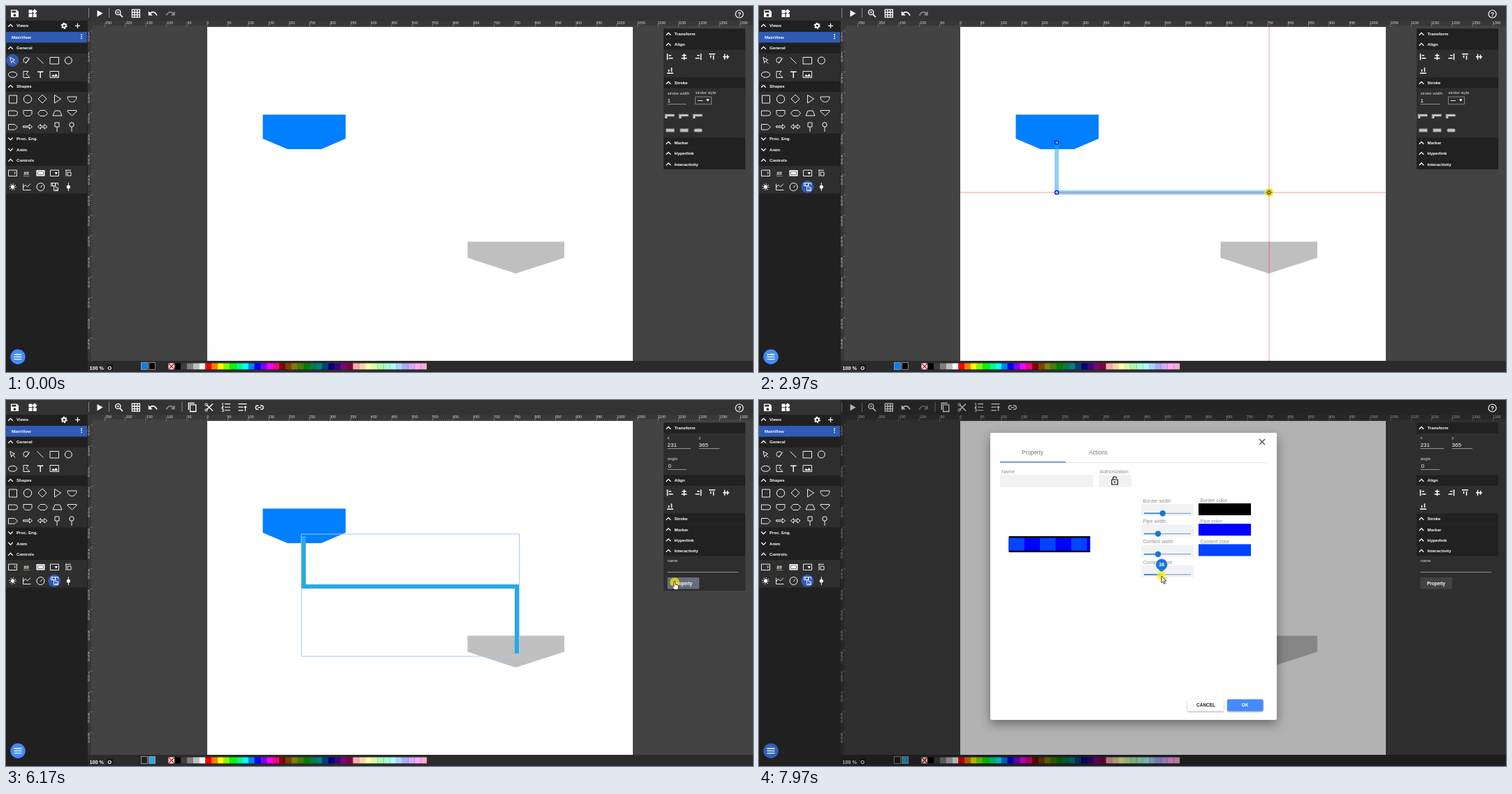
An HTML page that plays this animation: 1069 px wide and 524 px high, repeating every 8000 ms.

```html
<!DOCTYPE html>
<html lang="en">
<head>
<meta charset="utf-8">
<title>Pipe editor</title>
<style>
html,body{margin:0;width:100%;height:100%;overflow:hidden;background:#434343}
svg{display:block;width:1069px;height:524px}
text{font-family:"Liberation Sans",Arial,sans-serif;white-space:pre}
</style>
</head>
<body>
<svg id="stage" viewBox="0 0 1069 524" xmlns="http://www.w3.org/2000/svg"></svg>
<script>
const DARK = '#212121', PANEL = '#2e2e2e', BLUE = '#2f5bb5', PIPE = '#29a9e1';

const rect = (x, y, w, h, fill, more = '') =>
  `<rect x="${x}" y="${y}" width="${w}" height="${h}" fill="${fill}" ${more}/>`;
const circle = (x, y, r, fill, more = '') =>
  `<circle cx="${x}" cy="${y}" r="${r}" fill="${fill}" ${more}/>`;
const text = (x, y, s, size, fill = '#fff', more = '') =>
  `<text x="${x}" y="${y}" font-size="${size}" fill="${fill}" ${more}>${s}</text>`;
const line = (d, stroke = '#fff', w = 1, more = '') =>
  `<path d="${d}" fill="none" stroke="${stroke}" stroke-width="${w}" ${more}/>`;
const solid = (d, fill = '#fff', more = '') => `<path d="${d}" fill="${fill}" ${more}/>`;
const group = (id, body, more = '') => `<g id="${id}" ${more}>${body}</g>`;
const bold = 'font-weight="700"', middle = 'text-anchor="middle"';
const range = (n, f) => Array.from({length: n}, (_, i) => f(i)).join('');

const chevron = (x, y, up) => line(`M${x - 3.3} ${y + (up ? 1.8 : -1.6)}l3.3 ${up ? -3.4 : 3.4} 3.3 ${up ? 3.4 : -3.4}`, '#fff', 1.3);

function toolbar() {
  return rect(0, 0, 1069, 21, '#333') +
    solid('M7 5.5h8.5l2.5 2.5v8h-11zM8.3 6.8v2.8h6.2v-2.8zM12.4 11.3a1.9 1.9 0 1 0 .01 0z', '#fff', 'fill-rule="evenodd"') +
    rect(32.5, 5.5, 5, 4.8, '#fff') + rect(32.5, 11.2, 5, 4.8, '#fff') + rect(38.8, 11.2, 5, 4.8, '#fff') +
    solid('M41 4.2l3.6 3.6-3.6 3.6-3.6-3.6z') +
    line('M118.5 3v14M147.5 3v14', '#888') + solid('M130.5 6l8 4.6-8 4.9z') +
    circle(160.3, 9, 3.6, 'none', 'stroke="#fff" stroke-width="1.4"') +
    line('M163 11.8l4 4.2', '#fff', 1.7) + line('M158.5 9h3.6M160.3 7.2v3.6', '#fff', .8) +
    line('M180.4 5.2h11v11h-11zM184 5v11M187.8 5v11M180 9h12M180 12.6h12', '#fff', 1.3) +
    line('M206 10.5q6-5 10 3', '#fff', 1.7) + solid('M203.8 7.2v6.2h6z') +
    line('M239.500 10.5q-6-5-10 3', '#8a8a8a', 1.7) + solid('M241.800 7.2v6.2h-6z', '#8a8a8a');
}

function editTools() {
  return line('M252 3v14', '#888') +
    line('M263.5 6.800h8.300v9.700h-8.300zM261.300 14v-9.500h8.400', '#fff', 1.3) +
    line('M287 7l9 8.500M287 14l9-8.600', '#fff', 1.4) +
    circle(286.6, 6.5, 1.7, 'none', 'stroke="#fff"') + circle(286.6, 14.500, 1.7, 'none', 'stroke="#fff"') +
    line('M313 5.600h8M313 10.200h8M313 14.800h8M310 4v3.500M309 9h2l-2 2.500h2M309 13.300h2v3h-2', '#fff', 1.1) +
    line('M332.500 5.600h12M332.500 10.200h7M332.500 14.800h7M342.500 16v-7M340.700 11l1.800-2 1.800 2', '#fff', 1.2) +
    line('M361.500 8h-1.500a2.700 2.700 0 0 0 0 5.400h1.500M364 8h1.500a2.700 2.700 0 0 1 0 5.400h-1.500M360.500 10.700h4.800', '#fff', 1.3);
}

function rulers() {
  const u = 29.33;
  return rect(117, 21, 952, 9, '#383838') + rect(117, 30, 7, 478, '#383838') +
    line('M124 28.700H1069', '#777', 1.600, 'stroke-dasharray=".6 2.333" stroke-dashoffset="1.2"') +
    line('M122.800 30V508', '#777', 1.600, 'stroke-dasharray=".6 2.333" stroke-dashoffset="1"') +
    range(32, i => {
      const n = (i - 5) * 50, x = 288 + (i - 5) * u;
      return line(`M${x} 26v4`, '#999', .6) + text(x - .8, 26, n, 5.3, '#ddd');
    }) +
    range(16, i => {
      const y = 36.500 + i * u;
      return line(`M120 ${y - .5}h4`, '#888', .6) +
        [...String(100 + i * 50)].map((c, k) => text(117, y + 4.500 + k * 5, c, 5.3, '#ddd')).join('');
    });
}

function sidebar() {
  const heads = [[28, 'Views', 1], [60, 'General', 1], [115, 'Shapes', 1], [190, 'Proc. Eng.', 0], [205.500, 'Anim', 0], [220.800, 'Controls', 1]];
  const shapes = 'M5.800 73.500l2 8 1.600-3 3.200-1.300zM9.600 78.500l3.600 4M26 81q-3-6 2-7t4 3-5 4M28 82.500l6-8M44.500 73.500l9 9M63 73.500h12.500v9.500h-12.500z' +
    'M25 93.500h7l-3 4 5 5h-9zM63 93.500h12.500v9h-12.500z' +
    'M4.500 128h11v11h-11zM52 127l6 6-6 6-6-6zM69.500 127.500l9 5.500-9 6zM88 130h13c0 10-13 10-13 0z' +
    'M3.500 150h9.500a3.500 3.500 0 0 1 0 7h-9.500zM25 149.500h12v5l-3 3h-6l-3-3zM45.500 153.500l3.500-4h7l3.500 4-3.500 4h-7zM70 150h7l3 7h-13zM88 149.500h13v1.500l-6.500 6-6.500-6z' +
    'M3.500 169.500h9l4 3.800-4 3.800h-9zM24.500 171.800h9v-2.300l4 3.300-4 3.300v-2.300h-9zM45.500 172.800l4-3.300v2.300h5.500v-2.300l4 3.300-4 3.300v-2.300h-5.500v2.300zM70 167h6v6h-6zM73 173v7M94 173v7' +
    'M3.500 235h12v8.500h-12zM12.800 237v4M63.500 235h12v8.500h-12zM86 234.500v9.500M85 235.200h8M88 238h5v5h-5z' +
    'M24.500 254.500v9h11M24.500 260l3-4 3 3 4.500-4.500M49.300 260l2.700-3.500M89.300 253v12';
  const ring = (x, y, r) => circle(x, y, r, 'none', 'stroke="#fff"');
  return rect(0, 21, 117, 503, '#202020') + rect(0, 37, 116, 15.500, BLUE) +
    rect(0, 68, 116, 40, PANEL) + rect(0, 123, 116, 59.500, PANEL) + rect(0, 229, 116, 39.500, PANEL) +
    heads.map(([y, s, up]) => chevron(6.500, y, up) + text(15, y + 2.300, s, 6.1, '#fff', bold)).join('') +
    text(8, 46.500, 'MainView', 6.1, '#fff', bold) +
    [41, 43.700, 46.400].map(y => circle(108, y, .9, '#fff')).join('') +
    circle(83.200, 28.300, 2.500, 'none', 'stroke="#fff" stroke-width="1.900"') +
    circle(83.200, 28.300, 4, 'none', 'stroke="#fff" stroke-width="1.200" stroke-dasharray="2.100 2.090"') +
    line('M99 28.300h7M102.500 24.800v7', '#fff', 1.2) +
    circle(9.300, 78, 9, BLUE, 'id="pickTool"') + circle(69.300, 258.800, 9, BLUE, 'id="pipeTool"') +
    line(shapes, '#eee', 1) + line('M45 94.300h8.500M49.200 94v9', '#fff', 1.4) + solid('M65 101l2.500-3 2 2 2-3 3 4z') +
    ring(89.300, 78, 5) + ring(31, 133.300, 5.700) + ring(94, 170, 3.200) + ring(49.500, 259, 5.500) +
    '<ellipse cx="9.500" cy="98.300" rx="6.200" ry="4" fill="none" stroke="#fff"/>' +
    text(25.200, 241.500, '##', 7, '#fff', bold) + line('M25 243.500h9', '#c98b3a', .9) +
    rect(43.500, 235, 12, 8.500, '#fff') + line('M45.500 237h8v4.500h-8z', '#555', .8) + solid('M69.500 238h4.500l-2.200 3.500z') +
    circle(9.500, 259, 2.700, '#fff') + circle(9.500, 259, 4.300, 'none', 'stroke="#fff" stroke-width="1.400" stroke-dasharray="1 2.377"') +
    line('M64.500 253.500h6v4h-6zM66.500 253.500v4M68.500 257.500v7h6v-4.500h-3.500v-6.500h3.500v3M71 264v-2M73 264v-2', '#fff', .9) +
    circle(89.300, 259, 2.600, '#fff') +
    circle(17, 502.300, 10.700, '#448aff', 'id="menu"') + line('M11.500 499h11M11.500 502.300h11M11.500 505.600h11', '#fff', 1.3);
}

function bottomBar() {
  const greys = ['#000', '#3f3f3f', '#7f7f7f', '#bfbfbf', '#fff'];
  const cells = greys.concat(...[50, 25, 83.3].map(l => Array.from({length: 12}, (_, i) => `hsl(${i * 30},100%,${l}%)`)));
  return rect(117, 508, 952, 16, '#2b2b2b') + text(119.500, 520.500, '100 %', 7.2, '#fff', bold) +
    rect(144, 513, 9, 9, '#1c1c1c') + text(145.300, 521, 'O', 7.600, '#fff', bold) +
    rect(193.500, 510.500, 9, 10, '#007fff', 'id="fillBox" stroke="#aaa" stroke-width=".8"') +
    rect(204.500, 510.500, 9, 10, '#000', 'id="lineBox" stroke="#aaa" stroke-width=".8"') +
    rect(232.500, 511.500, 8.800, 8.800, '#fff') + line('M233 512l7.800 8M240.800 512l-7.800 8', '#d00', 1.2) +
    cells.map((c, i) => rect((241.300 + i * 8.800).toFixed(1), 511.500, 8.850, 8.800, c)).join('');
}

function rightPanel() {
  const head = (y, s) => rect(941, y - 7.500, 117, 15, DARK) + chevron(948, y, 1) + text(956.500, y + 2.200, s, 6.1, '#fff', bold);
  const side = 'M-4-4.500v9M-2-2h3.500M-2 2h6', mid = 'M0-4.500v9M-3-2h6M-4 2h8';
  const icon = (x, y, d, turn = '') => line(d, '#fff', 1.5, `transform="translate(${x} ${y}) ${turn}"`);
  const align = y => icon(950.500, y, side) + icon(970.500, y, mid) + icon(990.500, y, side, 'scale(-1 1)') +
    icon(1010.500, y, side, 'rotate(90) scale(1 -1)') + icon(1030.500, y, mid, 'rotate(90)') + icon(950.500, y + 19.500, side, 'rotate(-90)');
  const joins = [950.500, 970.500, 990.500].map(x =>
    line(`M${x - 6} 161v-4.500h12`, '#aaa', 3.5) + line(`M${x - 5} 161v-4.500h11`, '#fff', .6)).join('') +
    rect(944.500, 175.500, 12, 5, '#aaa') + rect(964.500, 175.500, 12, 5, '#aaa') + rect(984.500, 175.500, 12, 5, '#aaa', 'rx="2.500"') +
    line('M945 178h11M966 178h9M986 178h9', '#fff', .7);
  const field = (x, y, label, value, w) => text(x, y, label, 5.9, '#ddd') + text(x, y + 11, value, 8.1) + line(`M${x} ${y + 14}h${w}`, '#aaa', .8);
  return group('idlePanel', rect(941, 32.500, 117, 201.500, PANEL) + head(40, 'Transform') + head(55, 'Align') + align(72.700) +
      head(110, 'Stroke') + field(946.500, 126.500, 'stroke width', '1', 27.500) + text(986.500, 126, 'stroke style', 5.9, '#ddd') +
      line('M986.500 130h23v10.500h-23z', '#999', .8) + line('M990 135.500h7', '#fff', .9) + solid('M1002 133.300h4.500l-2.200 3.800z') + joins +
      head(196, 'Marker') + head(211, 'Hyperlink') + head(226.300, 'Interactivity')) +
    group('pickPanel', rect(941, 32.500, 117, 240.500, PANEL) + head(40, 'Transform') +
      field(946.500, 55.500, 'x', '231', 33.500) + field(991.500, 55.500, 'y', '365', 29.500) + field(946.500, 85.500, 'angle', '', 27.500) +
      text(947.500, 97, '0', 8.1) + head(115, 'Align') + align(132.700) +
      head(170, 'Stroke') + head(185.300, 'Marker') + head(200.500, 'Hyperlink') + head(215.800, 'Interactivity') +
      text(946.500, 231.500, 'name', 5.9, '#ddd') + line('M946.500 246.500h101.500', '#aaa', .8) +
      rect(946.500, 254, 45.500, 16.500, '#424242', 'id="propBtn" rx="1"') + text(969, 264.800, 'Property', 6.300, '#fff', `${middle} ${bold}`));
}

function canvas() {
  const node = (id, x, y, fill) => circle(x, y, 2.700, fill, `id="${id}" stroke="#00f" stroke-width="1.200"`);
  return rect(288, 30, 609, 478, '#fff') + solid('M367.500 155.500h118.500v34.500l-35 15h-48l-35.500-15z', '#007fff') +
    solid('M660.500 337.500h138.500v23l-69.500 22.500-69-22.500z', '#bfbfbf') +
    line('', PIPE, 6, 'id="pipe"') + line('', '#22c', .6, 'id="rubber"') +
    node('node0', 426, 195.500, '#18c8ff') + node('node1', 426, 267, '#9df') + node('node2', 730.800, 267, '#9df') +
    rect(422.500, 192, 312, 175, 'none', 'id="pickBox" stroke="#a9c8ff"') +
    line('', '#ff0000', 1, 'id="cross" opacity=".4"');
}

function dialog() {
  const gray = '#8f8f8f', slot = '#f1f2f4';
  const slider = (i, label, x) => {
    const y = 149 + i * 29.200;
    return rect(547, y, 75, 17, slot) + text(549.500, y - 2, label, 7.05, gray) +
      line(`M551 ${y + 13.300}h67`, '#6a9bcc', 1) +
      (i < 3 ? line(`M551 ${y + 13.300}H${x}`, '#1976d2', 1.400) + circle(x, y + 13.300, 4.200, '#1976d2') : '');
  };
  const color = (i, label, fill) => rect(629, 148 + i * 29.200, 75, 17, fill) + text(631.500, 146 + i * 29.500, label, 7.05, gray);
  return rect(331, 47, 410, 411, '#fff', 'rx="2" style="filter:drop-shadow(0 6px 8px rgba(0,0,0,.4))"') +
    line('M716 56l8 8M724 56l-8 8', '#444', 1.2) +
    text(391.500, 78, 'Property', 8.2, '#777', middle) + text(485.500, 78, 'Actions', 8.2, '#777', middle) +
    line('M345 89.800h383', '#ddd', .8) + line('M345 88.800h94', '#3668c4', 1.3) +
    text(347, 105.300, 'Name', 7.05, gray) + rect(345, 107, 133.500, 18, slot) +
    text(487.500, 105.300, 'Authorization', 7.05, gray) + rect(486, 107, 47, 18, slot) +
    line('M504.800 114h8.500v7h-8.500zM506.500 114v-1.500a2.600 2.600 0 0 1 5.200-.300', '#111', 1.2) + circle(509, 117.500, 1.1, '#111') +
    rect(357.500, 195, 116.500, 23, '#000') + rect(357.500, 197.500, 116.500, 18, '#00f') +
    line('M357.500 206.500H474', '#0044ff', 18, 'id="dash"') +
    slider(0, 'Border width', 577.700) + slider(1, 'Pipe width', 571) + slider(2, 'Content width', 571) + slider(3, 'Content dash', 583) +
    color(0, 'Border color', '#000') + color(1, 'Pipe color', '#00f') + color(2, 'Content color', '#0044ff') +
    line('', '#1976d2', 1.400, 'id="track"') +
    group('thumb', circle(0, 250, 4.200, '#1976d2')) +
    group('tip', solid('M0 246.500l-6.200-5.400a8.200 8.200 0 1 1 12.400 0z', '#1976d2') + text(0, 237.800, '<tspan id="val"></tspan>', 6.900, '#fff', `${middle} ${bold}`)) +
    rect(613, 428.500, 52, 17, '#fff', 'rx="2" style="filter:drop-shadow(0 1px 1px rgba(0,0,0,.35))"') +
    rect(670, 428.500, 51.500, 17, '#448aff', 'rx="2" style="filter:drop-shadow(0 1px 1px rgba(0,0,0,.35))"') +
    text(639.500, 439.200, 'CANCEL', 6.450, '#222', `${middle} ${bold}`) + text(695.700, 439.200, 'OK', 6.450, '#fff', `${middle} ${bold}`);
}

function pointer() {
  const ink = 'stroke="#111" stroke-width=".8" stroke-linejoin="round"';
  return circle(0, 0, 6.800, '#fff200', 'id="press" opacity=".7"') +
    group('arrow', solid('M0 0v9.600l2.200-2 1.600 3.700 1.700-.700-1.600-3.600h3z', '#fff', ink)) +
    group('hand', solid('M-1.200-1q1.200-1.200 2 0v4.200l4 .9q1 .4.800 2l-1 4.500h-5.200l-3.200-4.400q0-1.600 1.600-.700l1 .9z', '#fff', ink)) +
    group('move', line('M-4.500 0h9M0-4.500v9M-3.200-3.200l6.400 6.400M3.200-3.200l-6.400 6.400', '#333', 1) + circle(0, 0, 1.400, '#eee', 'stroke="#333" stroke-width=".6"'));
}

stage.innerHTML = rect(0, 0, 1069, 524, '#434343') + toolbar() + group('edit', editTools()) + rulers() + canvas() + bottomBar() +
  rect(117, 0, 952, 524, '#000', 'id="shade"') +
  circle(1049.500, 11.500, 5.500, 'none', 'stroke="#fff" stroke-width="1.200"') + text(1049.500, 14.500, '?', 8.500, '#fff', `${middle} ${bold}`) +
  sidebar() + rightPanel() + group('dialog', dialog()) + group('pointer', pointer());

// pointer path: time, x, y
const path = [
  [70, 832, 478], [170, 610, 430], [270, 230, 300], [370, 69, 260], [670, 69, 260], [770, 130, 250], [870, 260, 222],
  [970, 360, 203], [1170, 426, 195], [1370, 426, 196], [1470, 428, 208], [1770, 426, 267], [1970, 426, 267],
  [2370, 722, 268], [2570, 724, 268], [2670, 730, 267], [2970, 730, 267], [3770, 757, 363], [4070, 757, 363],
  [4270, 730, 363], [4970, 730, 363], [5570, 945, 270], [5870, 957, 261], [6370, 957, 261], [6470, 771, 205],
  [6570, 700, 182], [6670, 620, 176], [6770, 552, 186], [6870, 519, 208], [6970, 536, 230], [7170, 583, 242],
  [7270, 583, 242], [7370, 583, 251], [7470, 583, 252], [7970, 576, 252]];
const presses = [[570, 770], [1270, 1370], [1970, 2070], [2970, 3070], [4470, 4970], [6170, 6270], [7470, 8000]];

const $ = id => document.getElementById(id);
const set = (id, o) => { for (const k in o) $(id).setAttribute(k, o[k]); };
const show = (id, on) => set(id, {visibility: on ? 'visible' : 'hidden'});

function place(t) {
  const i = path.findIndex(k => k[0] > t);
  if (i < 0) return path.at(-1).slice(1);
  if (i === 0) return path[0].slice(1);
  const [a, ax, ay] = path[i - 1], [b, bx, by] = path[i], p = (t - a) / (b - a);
  return [ax + (bx - ax) * p, ay + (by - ay) * p];
}

function draw(t) {
  const within = (a, b) => t >= a && t < b;
  const [x, y] = place(t);
  const done = t >= 4970, open = t < 6270 ? 0 : t < 6370 ? .6 : 1;

  // tools and panels
  show('pickTool', t < 570);
  show('pipeTool', t >= 570);
  show('edit', t >= 5670);
  show('idlePanel', !done);
  show('pickPanel', done);
  set('fillBox', {fill: done ? '#222' : '#007fff'});
  set('lineBox', {fill: done ? PIPE : '#000'});
  set('propBtn', {fill: within(5870, 6370) ? '#666e7a' : '#424242'});

  // pipe being drawn
  const pts = [[426, 195], [426, 267], [731, 267], [731, 363]];
  const count = [1270, 1970, 2970, 4470].filter(s => t >= s).length;
  set('pipe', {d: count > 1 ? 'M' + pts.slice(0, count).join('L') : '', opacity: done ? 1 : t < 3070 ? .52 : .83});
  set('rubber', {d: count && count < 4 ? `M${pts[count - 1]}L${x} ${y}` : ''});
  show('node0', within(1270, 4970));
  set('node0', t >= 4770 ? {stroke: 'none', fill: '#5fd8ff'} : {stroke: '#00f', fill: '#18c8ff'});
  show('node1', within(1970, 4970));
  show('node2', within(3070, 4970));
  show('pickBox', done);
  set('cross', {d: within(670, 4970) && x > 288 ? `M${x} 30V508M288 ${y}H897` : ''});

  // dialog
  set('shade', {opacity: .3 * open});
  set('menu', {fill: open ? '#3261b5' : '#448aff'});
  show('dialog', open > 0);
  set('dialog', {opacity: open});
  const value = 48 - 10 * Math.max(0, Math.min(1, (t - 7470) / 500));
  const knob = 551.200 + value * .657, drag = t >= 7470;
  set('dash', {'stroke-dasharray': value * .587});
  set('track', {d: `M551 250H${knob}`});
  set('thumb', {transform: `translate(${knob} 0)`});
  set('tip', {transform: `translate(${knob} 0)`, display: drag ? 'inline' : 'none'});
  set('thumb', {display: drag ? 'none' : 'inline'});
  $('val').textContent = Math.round(value);

  // pointer
  const hand = within(370, 770) || within(5870, 6370), move = within(2970, 3070) || within(4470, 4970);
  set('pointer', {transform: `translate(${x} ${y})`, display: t < 70 ? 'none' : 'inline'});
  show('press', presses.some(([a, b]) => within(a, b)));
  show('hand', hand);
  show('move', move);
  show('arrow', !hand && !move);
}

const start = performance.now();
function tick() {
  const t = (performance.now() - start) % 8000;
  draw(t < 70 ? 0 : 70 + Math.floor((t - 70) / 100) * 100);
  requestAnimationFrame(tick);
}
tick();
</script>
</body>
</html>
```
